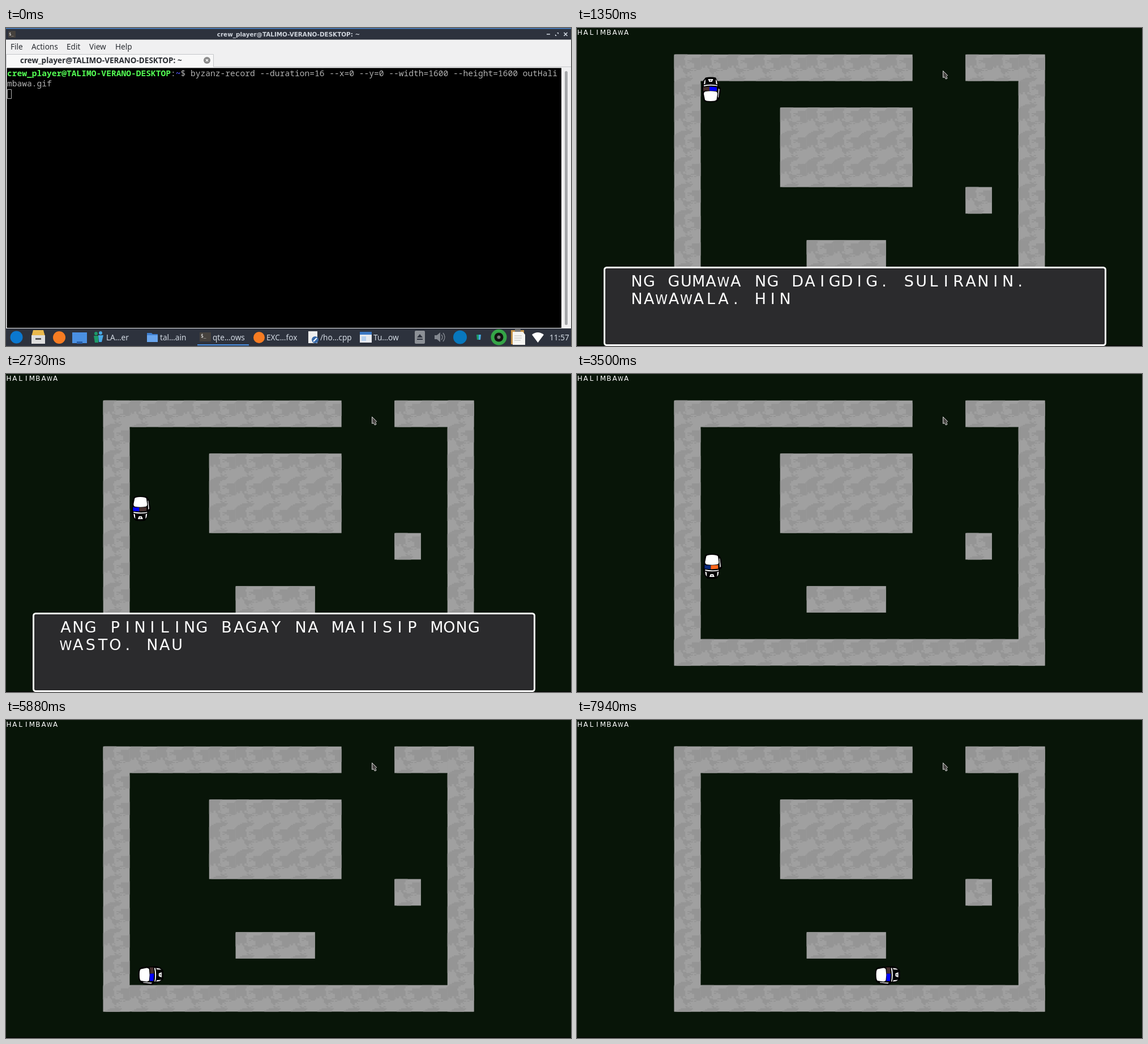
These frames come from a looping animation (998 px wide and 561 px high, 8 s). An HTML page:

```html
<!DOCTYPE html>
<html lang="en">
<head>
<meta charset="utf-8">
<title>Terminal and tile game</title>
<style>
html, body { margin: 0; width: 100%; height: 100%; overflow: hidden; background: #081508; }
svg { display: block; width: 998px; height: 561px; }
text { white-space: pre; }
.ui { font: 13.6px "Noto Sans", "Open Sans", sans-serif; }
.term { font: 14.6px "Noto Sans Mono", "DejaVu Sans Mono", monospace; fill: #b2b2b2; }
.cells { font-family: "DejaVu Sans", sans-serif; fill: #fff; text-anchor: middle; }
</style>
</head>
<body>
<svg viewBox="0 0 998 561">
  <g id="game">
    <path fill="#081508" d="M0 0H998V561H0z"/>
    <path fill="#000" d="M0 560H998V561H0z"/>
    <defs><path id="tile" fill="#959595"/></defs>
    <g id="walls" fill="#a0a0a0"></g>
    <g id="title" class="cells"></g>
    <g id="car">
      <path d="M-9-21Q0-23 9-21L13-13 14-5Q18-5 18 0L16 14Q14 21 8 22H-8Q-13 21-14 14L-15-3Q-16-13-13-16z"/>
      <g fill="#fff">
        <path d="M-12-9L-11-15-9-18-9.500-10zM12-9L11-15 9-18 9.500-10z"/>
        <path d="M-4.500-18.500H4.500L2.500-13.500H-2.500z"/>
        <path d="M-12-7.500Q0-10 12-7.500V-6Q0-8-12-5.500z"/>
        <path d="M14-2L15.500 0 14 14 13 14z"/>
        <path d="M-9 3.500Q0 2 9 3.500Q12 4 12 8L10.500 18Q9 20.500 0 20.500Q-9 20.500-10 18L-12 8Q-12 4-9 3.500z"/>
      </g>
      <path fill="#666" d="M-2-17H2L1-15H-1z"/>
      <path id="lampL" d="M-13-4L-2-5V2H-10L-13 3z"/>
      <path id="lampR" d="M-2-5L11-4V2.500L-2 2z"/>
    </g>
    <path fill="#4a4745" stroke="#ddd" d="M646.600 75.600V87.500L649.300 86.500 651.500 90 654 88.800 652.600 85.600 654.600 83.600z"/>
    <g id="dialog">
      <rect x="48.500" y="422.500" width="885" height="137" rx="4" fill="#2b2b2d" stroke="#fff" stroke-width="3"/>
      <g id="speech" class="cells"></g>
    </g>
  </g>

  <g id="desk">
    <path fill="#f0f0f1" d="M0 0H998V561H0z"/>
    <path fill="#2d323d" d="M0 0H998V20.500H0zM0 530H998V561H0z"/>
    <path fill="#4a86cf" d="M0 0H998V1.500H0z"/>
    <rect x="4" y="5" width="13" height="12" rx="1" fill="#45413d"/>
    <text x="5" y="13" font-size="7" font-family="DejaVu Sans Mono, monospace" fill="#fff">$_</text>
    <text x="499" y="14.500" text-anchor="middle" font-family="DejaVu Sans, sans-serif" font-weight="bold" font-size="10.400" fill="#cfd4dc">crew_player@TALIMO-VERANO-DESKTOP: ~</text>
    <path fill="none" stroke="#d3dae3" stroke-width="1.600" d="M955 11H961M985.500 8L991.500 14M991.500 8L985.500 14"/>
    <path fill="#d3dae3" d="M973 8H976V11zM970 11V14H973z"/>
    <g class="ui" fill="#2b2e33">
      <text x="8" y="38">File</text><text x="45" y="38">Actions</text><text x="107" y="38">Edit</text>
      <text x="147" y="38">View</text><text x="193" y="38">Help</text>
      <path fill="#f8f8f8" stroke="#c5c7ca" d="M.5 69V46.500H366.500V68.500H998"/>
      <text x="25" y="62" font-weight="bold" font-size="13.500">crew_player@TALIMO-VERANO-DESKTOP: ~</text>
    </g>
    <circle cx="355" cy="57" r="6" fill="#8a8a8a"/>
    <path stroke="#fff" stroke-width="1.300" d="M353 55L357 59M357 55L353 59"/>
    <path d="M1.500 70.500H981V529H1.500z"/>
    <rect x="987" y="76" width="5" height="448" rx="2.500" fill="#a5a7aa"/>
    <text class="term" x="2" y="85"><tspan fill="#54ff54" font-weight="bold">crew_player@TALIMO-VERANO-DESKTOP</tspan>:<tspan fill="#5454ff" font-weight="bold">~</tspan>$ byzanz-record --duration=16 --x=0 --y=0 --width=1600 --height=1600 outHali</text>
    <text class="term" x="2" y="103">mbawa.gif</text>
    <path fill="none" stroke="#b2b2b2" d="M2.500 108.500H9.500V124.500H2.500z"/>

    <circle cx="18.500" cy="545.500" r="11" fill="#0b78d0"/>
    <path fill="#e9b84c" d="M48 533H66L69 544H45z"/>
    <path fill="#dedede" d="M45 542H69V557H45z"/>
    <path fill="#555" d="M52 547H62V550H52z"/>
    <circle cx="94" cy="546" r="11" fill="#f77c22"/>
    <path fill="#4a90e2" d="M117 537H143V556H117z"/>
    <path fill="#285ea8" d="M125 553H135V557H125z"/>
    <g fill="#1c9b69"><circle cx="159" cy="539" r="3"/><path d="M155 543H163V555H157z"/></g>
    <g fill="#48a9e6"><circle cx="167" cy="538" r="3"/><path d="M163 542H172L169 554H164z"/></g>
    <path fill="#3f7fd0" d="M249 538H257L259 540H268V554H249z"/>
    <path fill="#69a5ed" d="M249 542H268V554H249z"/>
    <path fill="#46423e" d="M342 537H362V553H342z"/>
    <text x="344" y="546" font-size="8" font-family="DejaVu Sans Mono, monospace" fill="#fff">$_</text>
    <path fill="#4a90e2" d="M338 558H429V560H338z"/>
    <circle cx="447" cy="546" r="10" fill="#f77c22"/>
    <path fill="#eee" d="M534 535H550V556H534z"/>
    <circle cx="546" cy="550" r="6" fill="#3869a8"/>
    <path stroke="#fff" stroke-width="2" d="M543 553L549 547"/>
    <path fill="#e6e9ee" d="M625 536H646V555H625z"/>
    <path fill="#3b78c4" d="M625 536H646V541H625z"/>
    <path fill="#b5d0ef" d="M628 544H636V552H628z"/>
    <rect x="722" y="534" width="18" height="23" rx="2" fill="#8c9096"/>
    <path fill="#2d323d" d="M731 540L736 546H726zM726 548H736V550H726z"/>
    <path fill="#838890" d="M757 542H761L767 537V554L761 549H757z"/>
    <path fill="none" stroke="#838890" stroke-width="1.500" d="M769 541Q773 545.500 769 550M772 538Q778 545.500 772 553"/>
    <circle cx="802" cy="545.500" r="12" fill="#0878bd"/>
    <path fill="#1c9b69" d="M831 541H835V550H832z"/><path fill="#48a9e6" d="M835 541H839L838 550H835z"/>
    <circle cx="870.500" cy="545.500" r="14" fill="#35a447"/>
    <circle cx="870.500" cy="545.500" r="8" fill="#111"/>
    <circle cx="870.500" cy="545.500" r="3" fill="#777"/>
    <path fill="#c59348" d="M892 533H915V558H892z"/>
    <path fill="#f5f5f2" d="M895 536H913L917 541V559H895z"/>
    <path fill="#777" d="M899 531H909V536H899z"/>
    <path stroke="#bbb" d="M898 543H911M898 547H911M898 551H909"/>
    <path fill="#fff" d="M929 541Q939 533 950 541L939.500 555z"/>
    <g class="ui" fill="#d3dae3">
      <text x="177" y="551">LA…er</text><text x="272" y="551">tal…ain</text><text x="365" y="551">qte…ows</text>
      <text x="460" y="551">EXC…fox</text><text x="555" y="551">/ho…cpp</text><text x="649" y="551">Tu…ow</text>
      <text x="960" y="551">11:57</text>
    </g>
  </g>
</svg>
<script>
const $ = id => document.getElementById(id);
const LOOP = 8000, TILE = 46.77, LEFT = 171.7, CHAR_MS = 25;

// Wall blocks in tiles: column, row, width, height
const blocks = [[0,0,9,1], [11,0,3,1], [0,0,1,10], [13,0,1,10], [0,9,14,1], [4,2,5,3], [11,5,1,1], [5,7,3,1]];

// Ragged, mostly horizontal patches that repeat with the tile
function buildWalls() {
  const n = 24, c = TILE / n, wave = a => Math.sin(2 * Math.PI * a);
  let seed = 7, d = '', html = '', grain = 0;
  const random = () => (seed = seed * 16807 % 2147483647) / 2147483647;
  for (let j = 0; j < n; j++) for (let i = 0; i < n; i++) {
    const u = i / n, v = j / n;
    if (i % 2 === 0) grain = random() - .5;
    const mottle = wave(v + .15 * wave(u)) + .8 * wave(u + .3 * wave(v))
      + .6 * wave(2 * u - v) + .5 * wave(3 * v + u) + 1.3 * grain;
    if (mottle > .1) d += `M${(i * c).toFixed(2)} ${(j * c).toFixed(2)}h${c}v${c}h${-c}z`;
  }
  $('tile').setAttribute('d', d);
  for (const [x, y, w, h] of blocks) {
    const left = LEFT + x * TILE, top = (y + 1) * TILE;
    html += `<rect x="${left}" y="${top}" width="${w * TILE}" height="${h * TILE}"/>`;
    for (let k = 0; k < w * h; k++)
      html += `<use href="#tile" x="${left + k % w * TILE}" y="${top + Math.floor(k / w) * TILE}"/>`;
  }
  $('walls').innerHTML = html;
}

// One glyph centred in each cell; W is reduced to fit its cell
function cellText(str, x, y, pitch, size) {
  const spans = [...str].map((ch, i) =>
    `<tspan x="${(x + i * pitch).toFixed(2)}" font-size="${ch === 'W' ? size * .82 : size}">${ch}</tspan>`);
  return `<text y="${y}">${spans.join('')}</text>`;
}

const pages = [
  { start: 225, lines: ['NG GUMAWA NG DAIGDIG. SULIRANIN.', 'NAWAWALA. HINDI MAHANAP'] },
  { start: 1630, lines: ['ANG PINILING BAGAY NA MAIISIP MONG', 'WASTO. NAUNAWAAN?'] }
];
let shown = '';

function drawSpeech(t) {
  const { start, lines } = pages[t < pages[1].start ? 0 : 1];
  const count = Math.max(0, Math.floor((t - start) / CHAR_MS));
  const first = lines[0].slice(0, count);
  const second = lines[1].slice(0, Math.max(0, count - lines[0].length));
  if (first + second === shown) return;
  shown = first + second;
  $('speech').innerHTML = cellText(first, 105.5, 456, 21.85, 27) + cellText(second, 105.5, 487, 21.85, 27);
}

// Up to the top wall, down along the left side, then right
function carPose(t) {
  if (t < 1756) return { x: 236, y: 108.5 + .1325 * Math.max(0, 1250 - t), turn: '' };
  if (t < 5105) {
    const y = Math.min(452, 108.5 + .1325 * (t - 1756));
    return { x: 236 + 3.5 * (y - 108.5) / 343.5, y, turn: 'scale(1 -1)', down: true };
  }
  return { x: Math.max(234.5, 256.5 + .142 * (t - 5880)), y: 449.5, turn: 'rotate(90)' };
}

function drawCar(t) {
  const { x, y, turn, down } = carPose(t);
  const lamps = t % 700 < 200 ? ['#ff681c', '#0a2a80'] : ['#46302f', '#0000ff'];
  if (down) lamps.reverse();
  $('car').setAttribute('transform', `translate(${x} ${y}) ${turn}`);
  $('lampL').setAttribute('fill', lamps[0]);
  $('lampR').setAttribute('fill', lamps[1]);
}

// The picture advances in short steps: start, step length
const beats = [[0,100], [300,150], [450,100], [1350,96], [2240,98], [3240,260], [3500,95],
  [4360,92.5], [5200,97], [6070,95], [6930,101], [7740,100]];

function snap(t) {
  const [start, step] = beats.findLast(b => b[0] <= t);
  return start + step * Math.min(8, Math.floor((t - start) / step));
}

function show(id, on) { $(id).style.display = on ? '' : 'none'; }

function draw() {
  const t = snap(performance.now() % LOOP);
  show('desk', t < 100);
  show('dialog', t < 3500);
  drawSpeech(t);
  drawCar(t);
  requestAnimationFrame(draw);
}

buildWalls();
$('title').innerHTML = cellText('HALIMBAWA', 5, 12, 10.25, 12);
draw();
</script>
</body>
</html>
```
